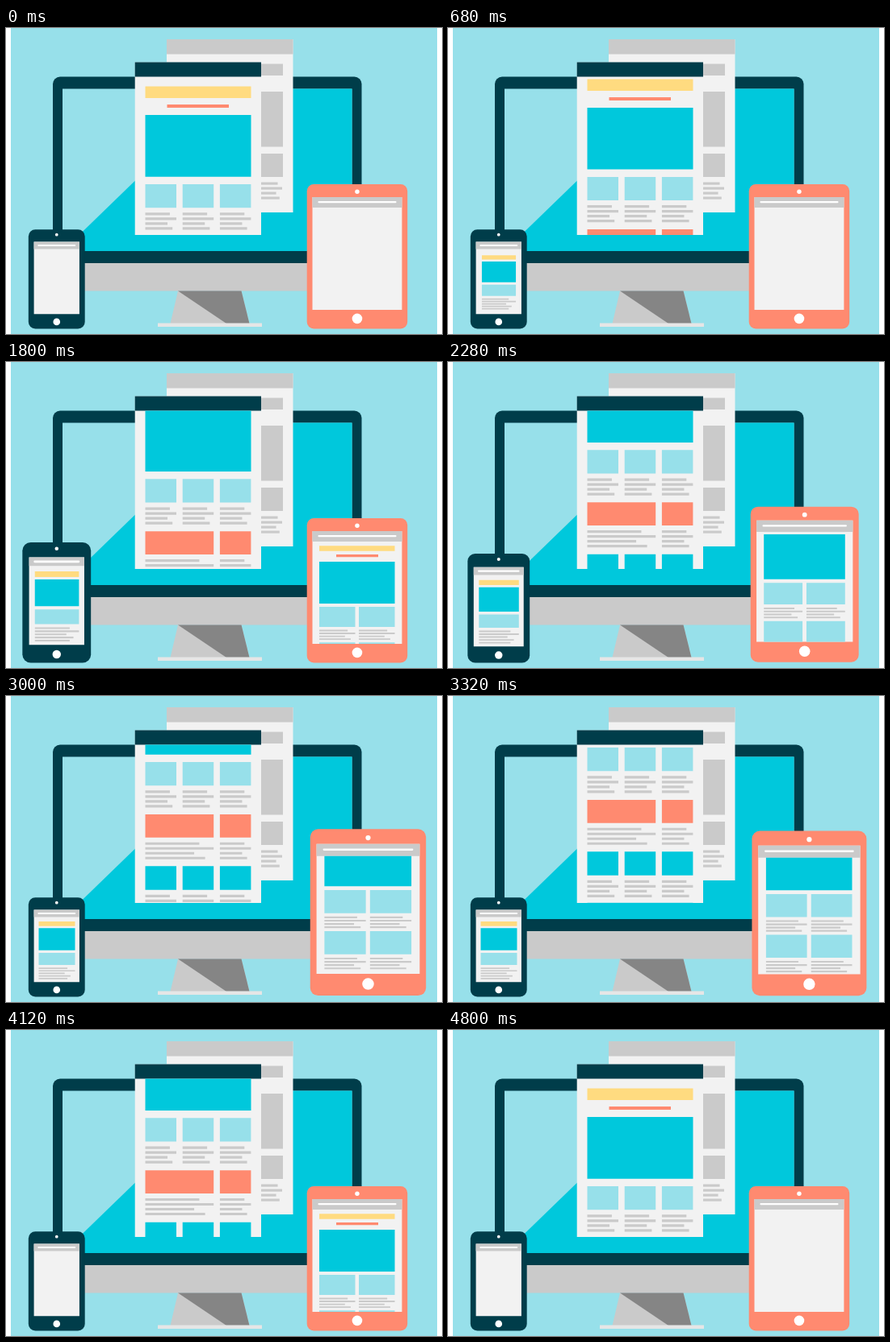
Animation, 540 px wide and 380 px high, one loop 5.04 s. Source, as an HTML page with a canvas:

```html
<!DOCTYPE html>
<html lang="en">
<head>
<meta charset="utf-8">
<title>Responsive devices</title>
<style>
  html, body { margin: 0; height: 100%; overflow: hidden; background: #fff; }
  canvas { display: block; }
</style>
</head>
<body>
<canvas id="stage" width="540" height="380"></canvas>
<script>
const ctx = document.getElementById('stage').getContext('2d');
const SKY = '#97e0ea', CYAN = '#00c8dc', NAVY = '#003d4a', GREY = '#cacaca',
      PAPER = '#f2f2f2', CORAL = '#ff8a70', YELLOW = '#ffdb80', WHITE = '#fff';
const LOOP = 5040;
const RAGGED = [0.79, 1, 0.715, 0.875]; // line lengths of a paragraph

function box(color, x, y, w, h, radius = 0) {
  ctx.fillStyle = color;
  ctx.beginPath();
  ctx.roundRect(x, y, w, h, radius);
  ctx.fill();
}

function poly(color, ...points) {
  ctx.fillStyle = color;
  ctx.beginPath();
  for (const [x, y] of points) ctx.lineTo(x, y);
  ctx.fill();
}

function paragraph(x, y, w, step, count = 4) {
  for (let i = 0; i < count; i++) {
    box(GREY, x, y + i * step, w * RAGGED[i % 4], step * 0.53);
  }
}

// A coloured tile with a paragraph one line step below it.
function card(color, x, y, w, h, step, count) {
  box(color, x, y, w, h);
  paragraph(x, y + h + step, w, step, count);
}

function clipped(x, y, w, h, draw) {
  ctx.save();
  ctx.beginPath();
  ctx.rect(x, y, w, h);
  ctx.clip();
  draw();
  ctx.restore();
}

function scaled(x, y, s, draw) {
  if (s <= 0) return;
  ctx.save();
  ctx.translate(x, y);
  ctx.scale(s, s);
  ctx.translate(-x, -y);
  draw();
  ctx.restore();
}

// Eased 0 to 1 between two film frames.
function ease(f, from, to) {
  const u = Math.min(1, Math.max(0, (f - from) / (to - from)));
  return u * u * (3 - 2 * u);
}

function monitor() {
  box(GREY, 58, 200, 382.5, 126.5, 8);
  box(NAVY, 58, 60.5, 382.5, 231.5, [9, 9, 0, 0]);
  box(SKY, 70, 75.5, 358.5, 201.5);
  poly(CYAN, [277.3, 75.5], [428.5, 75.5], [428.5, 277], [70, 277]);
  poly(GREY, [213, 326.5], [291.5, 326.5], [301.5, 367], [203.5, 367]);
  poly('#858585', [213, 326.5], [291.5, 326.5], [301.5, 367], [273, 367]);
  box('#e6e6e6', 188, 366.5, 129, 4.5);
}

function backPage() {
  box(PAPER, 199, 14, 156.5, 215);
  box(GREY, 199, 14, 156.5, 18.5);
  box(GREY, 316, 44.5, 27, 14.5);
  box(GREY, 316, 79, 27, 68.5);
  box(GREY, 316, 156, 27, 29);
  paragraph(316, 191.5, 26, 6);
}

function frontPage(scroll) {
  const left = 172.5, width = 131, column = 38.5, pitch = 46.2, step = 6;
  box(PAPER, 159.7, 42.5, 156.3, 214.5);
  box(NAVY, 159.7, 42.5, 156.3, 18);
  clipped(159.7, 60.5, 156.3, 196.5, () => {
    ctx.translate(0, -scroll);
    box(YELLOW, left, 72.5, width, 14.5);
    box(CORAL, 199.5, 95, 76.5, 4);
    box(CYAN, left, 108, width, 76.7);
    for (let i = 0; i < 3; i++) {
      card(SKY, left + i * pitch, 194, column, 29.2, step);
      card(CYAN, left + i * pitch, 323.3, column, 29.5, step);
    }
    card(CORAL, left, 259, column + pitch, 28.6, step);
    card(CORAL, left + 2 * pitch, 259, column, 28.6, step);
    box(SKY, left, 386.5, width, 5.5);
  });
}

// Body, speaker, home button and screen; sizes follow the button radius.
function device(color, x, y, w, h, button, screenTop, screenHeight, content) {
  const middle = x + w / 2, bezel = 6.8, header = button * 2.07, inset = button * 1.1;
  const screenWidth = w - 2 * bezel;
  const dot = (cy, r) => box(WHITE, middle - r, cy - r, 2 * r, 2 * r, r);
  box(color, x, y, w, h, 8.5);
  dot(y + button * 1.48, button * 0.43);
  dot(y + h - button * 2, button);
  box(PAPER, x + bezel, screenTop, screenWidth, screenHeight);
  box(GREY, x + bezel, screenTop, screenWidth, header);
  box(WHITE, x + bezel + inset, screenTop + header * 0.38, screenWidth - 2 * inset, 2.2, 1);
  clipped(x + bezel, screenTop + header, screenWidth, screenHeight - header, content);
}

function phone(scale, contentScale) {
  const left = 40.5, width = 45;
  const content = () => scaled(62.9, 315.8, contentScale, () => {
    box(YELLOW, left, 280, width, 5.7);
    box(CYAN, left, 288.2, width, 27.5);
    card(SKY, left, 319, width, 15, 3.2, 5);
  });
  scaled(62.7, 373.5, scale, () =>
    device(NAVY, 27.8, 250.3, 69.9, 123.2, 4.3, 265.5, 89.7, content));
}

function tablet(scale, contentScale, scroll) {
  const left = 388, width = 93.5, column = 44.5;
  const content = () => scaled(435, 286, contentScale, () => {
    ctx.translate(0, -scroll);
    box(YELLOW, left, 228.2, width, 6.5);
    box(CORAL, 409, 239, 52, 3.2);
    box(CYAN, left, 248, width, 52);
    for (let i = 0; i < 4; i++) {
      card(SKY, left + (i % 2) * (width - column), 304 + (i >> 1) * 44.3, column, 25, 3.55);
    }
  });
  scaled(346, 383, scale, () =>
    device(CORAL, 372.7, 194, 124.5, 179.5, 6.3, 210, 140, content));
}

function draw(ms) {
  // 24 film frames per second shown at 25, so one frame repeats each second.
  const f = Math.floor(Math.floor(ms / 40) * 0.96 + 0.45);
  const move = (from, to) => ease(f, from, to);
  const rise = move(45, 65);

  box(WHITE, 0, 0, 540, 380);
  box(SKY, 6, 0, 528, 380);
  monitor();
  backPage();
  frontPage(49 * move(5, 45) + 55 * move(46, 61) + 36 * move(65, 88) - 140 * move(87.7, 114));
  phone(1 + 0.214 * (move(24, 36) - move(43, 66)), move(5, 18) - move(83.5, 99));
  tablet(1 + 0.152 * (rise - move(77.5, 92)),
         move(24, 35) - move(100, 112),
         44.3 * (rise - move(77.5, 93.1)));
}

const start = performance.now();
function tick() {
  draw((performance.now() - start) % LOOP);
  requestAnimationFrame(tick);
}
tick();
</script>
</body>
</html>
```
